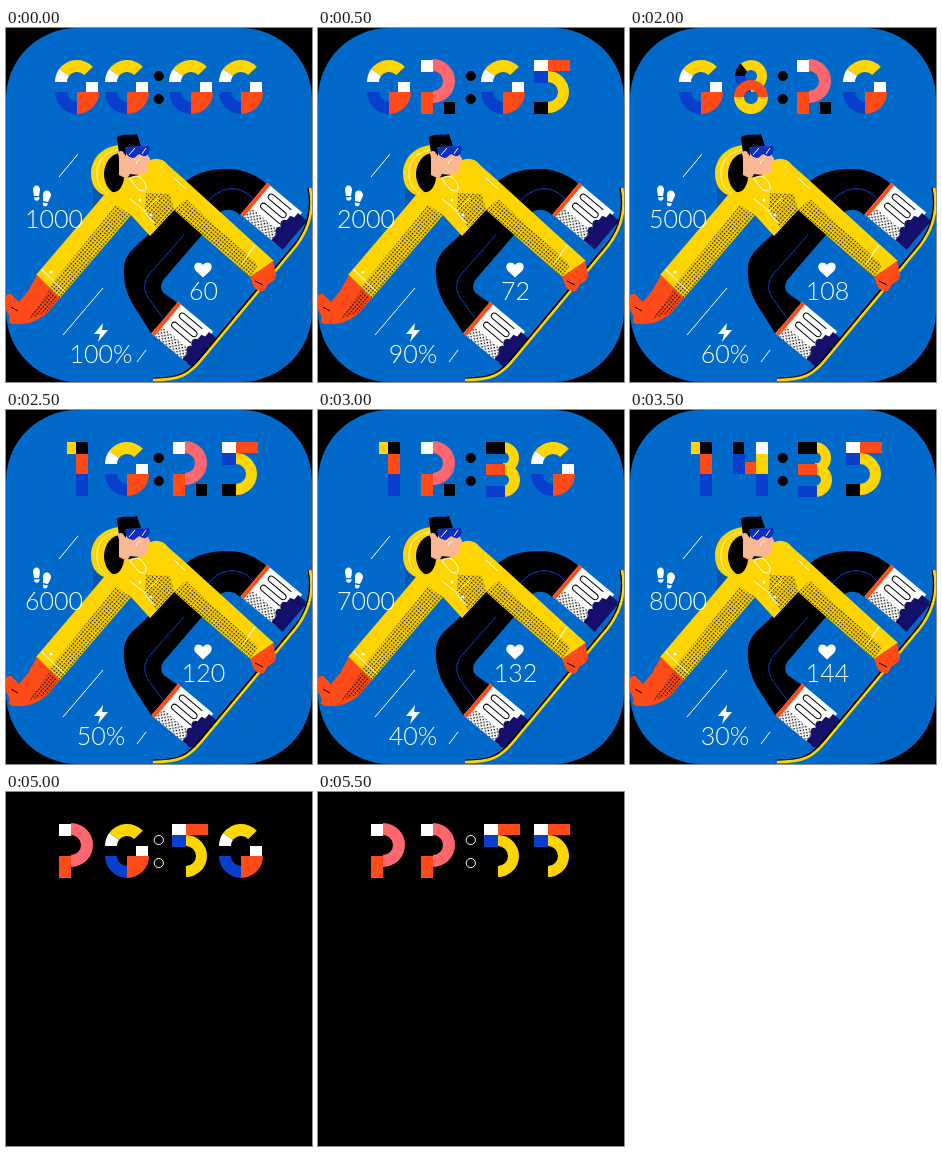
An HTML page for the animation above (6000 ms loop, 306 px wide and 354 px high).

```html
<!DOCTYPE html>
<html lang="en">
<head>
<meta charset="utf-8">
<title>Watch face</title>
<style>
html, body { margin: 0; width: 100%; height: 100%; overflow: hidden; background: #000; }
svg { display: block; width: 100vw; height: 100vh; }
text { font: 300 25px Lato, Inter, sans-serif; fill: #fff; text-anchor: middle; }
.y { fill: #ffd500; } .o { fill: #ff4b17; } .w { fill: #fff; } .k { fill: #000; }
.b { fill: #0a3fcb; } .p { fill: #ff666e; } .n { fill: #14106b; } .s { fill: #f9b792; }
.line { fill: none; stroke: #fff; stroke-width: 1; }
.ink { fill: none; stroke: #000; stroke-width: 1; }
</style>
</head>
<body>
<svg viewBox="0 0 306 354" xmlns="http://www.w3.org/2000/svg">
  <defs>
    <clipPath id="face"><rect width="306" height="354" rx="71"/></clipPath>
    <pattern id="dots" width="3" height="3" patternUnits="userSpaceOnUse" patternTransform="rotate(40)">
      <rect width="1.4" height="1.4"/>
    </pattern>
    <pattern id="grain" width="3" height="3" patternUnits="userSpaceOnUse" patternTransform="rotate(40)">
      <rect width="1.4" height="1.4" fill="#005cb8"/>
    </pattern>
    <!-- x runs from the leg to the board, y along the board -->
    <g id="boot">
      <rect class="w" y="0" width="46" height="41"/>
      <rect x="4" y="29" width="40" height="12" fill="url(#dots)"/>
      <rect class="o" width="4" height="41"/>
      <path class="ink" d="M36 5H13C8 5 8 11 13 11H32C37 11 37 17 32 17H13C8 17 8 23 13 23H36"/>
      <path class="n" d="M43 3L55 3L55 41L40 41V33C35 31 35 26 39 25C34 22 35 17 39 16V10L43 9Z"/>
    </g>
  </defs>
  <rect width="306" height="354"/>
  <g id="art" clip-path="url(#face)">
    <rect width="306" height="354" fill="#0069c9"/>
    <path d="M306 205V354H190L200 330L290 222Z" fill="url(#grain)"/>
    <path d="M87 160L99 166L87 180Z" fill="#0058b0"/>
    <path class="line" d="M53 149L72 126M57 307L97 260M131 334L140 322"/>

    <!-- legs -->
    <path class="k" d="M179 154C193 143 207 141 222 141C239 141 251 148 261 156L234 187C227 180 217 180 211 187L195 208L158 251C154 256 154 263 159 266L173 276L145 305L131 283C124 273 119 262 118 248C117 236 119 229 127 221L143 206L165 175Z"/>
    <path d="M200 176C214 157 234 156 247 171M178 207L145 244C137 253 137 262 143 271L157 290" fill="none" stroke="#0a3fcb"/>

    <use href="#boot" transform="translate(261 155) rotate(40)"/>
    <use href="#boot" transform="translate(172 274) rotate(40)"/>

    <!-- board -->
    <g fill="none">
      <path d="M303 160C308 185 299 205 289 217L195 330C182 346 173 351 147 351" stroke="#000" stroke-width="3"/>
      <path d="M304 160C309 185 300 205 290 218L196 331C183 347 174 352 147 352" stroke="#ffd500" stroke-width="2.6"/>
    </g>

    <!-- jacket -->
    <path class="y" d="M117 117C97 117 85 130 85 146C85 156 90 164 98 167L30 247L54 270L125 187L144 208L168 182L244 249L268 233L179 152L162 137C157 130 149 129 143 133L132 122Z"/>
    <ellipse class="k" cx="115" cy="146" rx="17" ry="21"/>
    <path d="M114 122C98 123 90 134 91 148C91 156 96 162 102 166" fill="none" stroke="#fff" stroke-width=".8"/>
    <path class="y" d="M118 150L140 146L152 166L112 182L104 164C112 166 117 159 118 150Z"/>
    <path d="M110 177L125 187L54 270L43 259ZM140 165L164 166L168 182L150 200L139 181ZM168 182L180 171L252 237L244 249Z" fill="url(#dots)"/>
    <path class="line" d="M35 241L59 264M124 151C130 145 137 149 140 158C141 164 136 164 132 161ZM124 171L139 183L152 170M138 183L148 195M168 150L180 161M249 217L236 236"/>
    <g class="w"><circle cx="45" cy="244" r="1.6"/><circle cx="145" cy="187" r="1.5"/><circle cx="134" cy="172" r="1.5"/></g>

    <!-- gloves -->
    <path class="o" d="M31 247L54 270L42 284C33 293 21 297 9 296C4 296 1 293 4 290L-2 276C-4 269 0 266 5 266L13 274L22 263Z"/>
    <path d="M41 284L52 270L44 261L34 275L23 291Z" fill="url(#dots)"/>
    <path d="M5 279L12 283" stroke="#000"/>
    <path class="o" d="M267 233L270 246C270 251 267 254 262 256L258 263C253 264 249 262 247 257L244 249Z"/>
    <path class="ink" d="M249 253L257 257"/>

    <!-- head -->
    <path class="s" d="M113 122L141 118L142 127L145 133L142 135L141 143C138 148 130 147 124 146L121 151L113 147Z"/>
    <path class="k" d="M111 109C117 105 124 108 131 106L135 118L120 119L120 128L116 123L113 126Z"/>
    <path class="s" d="M112 124C116 121 119 125 117 130C114 132 112 129 112 124Z"/>
    <path d="M119 119L143 118C145 124 142 129 137 128L133 126L128 130C122 130 119 126 119 119Z" fill="#0a2fc3"/>
    <path class="line" d="M123 127L129 120M136 126L140 120M130 136C131 132 133 131 135 132"/>

    <!-- icons -->
    <g class="w">
      <path d="M27 162C27 156 34 156 34 162L33 168H28ZM28 169.5L33.5 169C34 174 28 174 28 169.5ZM37 167C37 161 45 161 45 168L42 174L37 173ZM37 174.5L42 175.5C41 180 36 179 37 174.5Z"/>
      <path d="M197 249.5L190 243C185 237 192 231 197 237C202 231 209 237 204 243Z"/>
      <path d="M97 295L88 306H94L92 314L102 302H96Z"/>
    </g>
    <text id="steps" x="48" y="200"></text>
    <text id="pulse" x="197.5" y="271.5"></text>
    <text id="power" x="95" y="335"></text>
  </g>
  <g id="clock"></g>
  <g id="colon"><circle cx="152.8" cy="48" r="4.6"/><circle cx="152.8" cy="71" r="4.6"/></g>
</svg>
<script>
const STEP = 500, COUNT = 12, DIM_FROM = 10;
const SLOTS = [49, 99, 163, 213];
const $ = id => document.getElementById(id);

const box = (c, x, y, w, h) => `<rect class="${c}" x="${x}" y="${y}" width="${w}" height="${h}"/>`;

// Ring sector, angles in degrees clockwise from the right
function arc(c, cx, cy, R, r, from, to) {
  const at = (rad, deg) => {
    const a = deg * Math.PI / 180;
    return `${(cx + rad * Math.cos(a)).toFixed(2)} ${(cy + rad * Math.sin(a)).toFixed(2)}`;
  };
  const big = to - from > 180 ? 1 : 0;
  return `<path class="${c}" d="M${at(R, from)}A${R} ${R} 0 ${big} 1 ${at(R, to)}L${at(r, to)}A${r} ${r} 0 ${big} 0 ${at(r, from)}Z"/>`;
}

const round = arc('y', 22, 22, 22, 10, 216, 316) + arc('w', 22, 22, 22, 10, 180, 216) +
  arc('b', 22, 32, 22, 10, 90, 180) + arc('o', 22, 32, 22, 0, 0, 90);

const GLYPHS = {
  0: round + box('w', 31, 22, 12, 10),
  1: box('y', 12, 0, 9, 12) + box('k', 21, 0, 12, 12) + box('o', 21, 12, 12, 20) + box('b', 21, 32, 12, 22),
  2: box('w', 4, 0, 12, 12) + arc('p', 16, 21, 22, 10, -90, 90) + box('o', 4, 32, 12, 22) + box('k', 27, 42, 11, 12),
  3: box('k', 5, 0, 19, 12) + arc('y', 22, 16, 16, 6, -90, 90) + arc('y', 22, 38, 17, 6, -90, 90) +
     box('k', 5, 0, 19, 11) + box('o', 5, 22, 19, 11) + box('b', 5, 44, 19, 11),
  4: box('k', 4, 0, 11, 12) + box('b', 4, 12, 12, 20) + box('o', 16, 20, 11, 12) +
     box('w', 27, 0, 12, 12) + box('y', 27, 12, 12, 20) + box('b', 27, 32, 12, 22),
  5: box('w', 3, 0, 14, 11) + box('o', 17, 0, 22, 11) + box('b', 3, 11, 14, 12) +
     arc('y', 17, 32, 21, 10, -90, 90) + box('k', 3, 42, 14, 12),
  6: round + box('w', 22, 22, 21, 10),
  8: arc('y', 22, 16, 16, 6, 230, 450) + arc('k', 22, 16, 16, 6, 180, 230) + arc('b', 22, 16, 16, 6, 90, 180) +
     arc('o', 22, 37, 17, 7, 180, 360) + arc('y', 22, 37, 17, 7, 0, 180)
};

function show(n) {
  const two = v => String(v).padStart(2, '0');
  const dim = n >= DIM_FROM;
  $('art').style.display = dim ? 'none' : '';
  $('clock').innerHTML = [...two(2 * n) + two(5 * n)]
    .map((ch, i) => `<g transform="translate(${SLOTS[i]} 32)">${GLYPHS[ch]}</g>`).join('');
  $('colon').setAttribute('stroke', dim ? '#fff' : '#000');
  $('steps').textContent = 1000 * (n + 1);
  $('pulse').textContent = 60 + 12 * n;
  $('power').textContent = 100 - 10 * n + '%';
}

let shown = 0;
show(0);
const start = performance.now();
function tick() {
  const n = Math.floor((performance.now() - start) / STEP) % COUNT;
  if (n !== shown) show(shown = n);
  requestAnimationFrame(tick);
}
requestAnimationFrame(tick);
</script>
</body>
</html>
```
